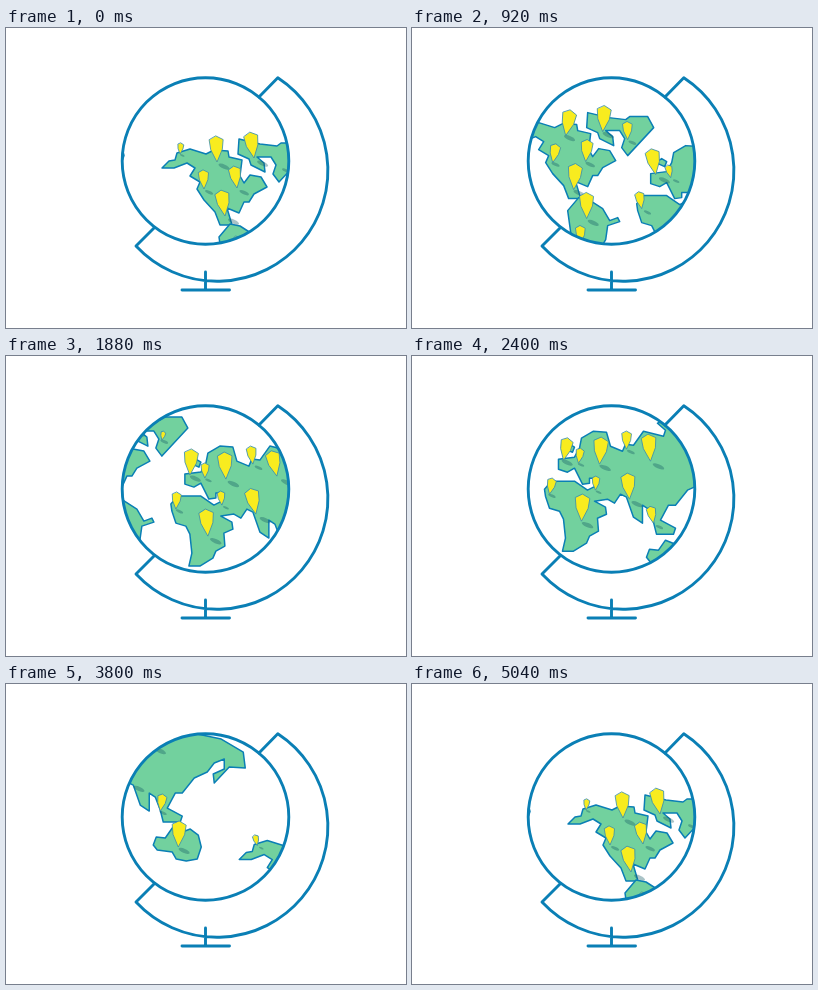
Recreate the animation shown at these times as an HTML page with a canvas. Size 400x300 px, loop 5.08 s.

```html
<!DOCTYPE html>
<html lang="en">
<head>
<meta charset="utf-8">
<title>Spinning globe</title>
<style>
  html, body { margin: 0; width: 100%; height: 100%; overflow: hidden; background: #fff; }
  canvas { display: block; width: 400px; height: 300px; }
</style>
</head>
<body>
<canvas id="stage"></canvas>
<script>
const LOOP = 5080, STEP = 40;
const TURN = { x: 314, y: 144.5 };
const GLOBE = { x: 199.5, y: 133, r: 83.3 };
const AXIS = { x: 0.908, y: 0.418 };
const BLUE = '#0a7fb5', GREEN = '#72d19e', YELLOW = '#f8ec1f';

const northAmerica = new Path2D('M156 140L163 133 169 132 171 125 184 121 200 126 208 122 222 123 223 129 236 132 234 148 238 155 244 147 255 149 261 159 248 166 243 174 238 174 233 185 221 180 226 197 214 197 209 184 198 172 191 161 194 154 184 148 189 140 181 135 168 140Z');

const arctic = new Path2D('M233 111L232 126 243 131 245 137 259 144 258 135 251 129 265 129 270 137 267 146 273 154 299 126 293 115 275 115 271 118 254 116Z');

const southAmerica = new Path2D('M213 209L224 196 234 198 248 207 255 219 263 216 265 220 253 224 251 238 235 265 218 245Z');

const oldWorld = new Path2D('M283 209L282 202 289 194 312 194 325 203 333 199 334 191 327 191 327 196 320 197 312 181 305 185 296 182 296 172 312 170 317 161 319 151 331 144 344 145 348 159 360 164 363 157 371 158 381 144 401 149 403 143 395 136 402 133 414 146 428 159 452 164 474 177 476 193 460 192 445 208 444 199 455 194 455 184 445 188 438 197 425 203 413 218 406 218 398 233 413 241 411 247 394 247 391 235 386 222 380 218 380 236 371 230 364 210 358 207 352 216 345 212 332 214 343 220 344 227 335 231 336 244 327 249 324 256 311 264 300 264 303 251 301 232 297 224 287 221Z');

const isle = new Path2D('M301 161L307 157 312 160 310 165Z');

const australia = new Path2D('M384 270L387 262 396 263 403 253 413 257 421 254 429 260 432 272 428 284 417 286 407 284 403 277 388 275Z');

const lands = [northAmerica, arctic, southAmerica, oldWorld, isle, australia];

// Tip x, tip y, height
const pins = [
  [174, 126, 11], [248, 130, 26], [211, 134, 26], [273, 138, 18],
  [231, 160, 22], [198, 161, 19], [219, 188, 26], [232, 217, 26], [226, 242, 18],
  [364, 162, 18], [301, 173, 26], [388, 174, 27], [316, 176, 15],
  [337, 177, 27], [333, 203, 14], [287, 207, 17], [367, 212, 26],
  [319, 234, 27], [391, 236, 17], [409, 272, 26]
];
const pinShape = new Path2D('M0-26L7-22.2L5.8-12.5L0 0L-5.8-12.5L-7-22.2Z');
const frame = new Path2D('M253 69L271.8 49.8A110.8 110.8 0 1 1 130 218L148.5 199.5M199.5 244V262M176 262H223.5');
const disc = new Path2D();
disc.arc(GLOBE.x, GLOBE.y, GLOBE.r, 0, Math.PI * 2);

const canvas = document.getElementById('stage');
const ctx = canvas.getContext('2d');
const dpr = window.devicePixelRatio || 1;
canvas.width = 400 * dpr;
canvas.height = 300 * dpr;

function smooth(a, b, v) {
  const k = Math.min(1, Math.max(0, (v - a) / (b - a)));
  return k * k * (3 - 2 * k);
}

// Signed distance from the globe's axis, along the direction of travel
const across = (x, y) => (x - GLOBE.x) * AXIS.x + (y - GLOBE.y) * AXIS.y;

function drawShadow(x, y, h) {
  const k = h / 26, d = (6.5 + across(x, y) * 0.05) * k;
  ctx.fillStyle = 'rgba(20, 90, 100, 0.36)';
  ctx.beginPath();
  ctx.ellipse(x + d, y + d * 0.65, 6 * k, 2.1 * k, 0.42, 0, Math.PI * 2);
  ctx.fill();
}

function drawPin(x, y, h) {
  const s = across(x, y);
  const size = smooth(-68, -52, s) * smooth(69, 58, s) * h / 26;
  if (size < 0.02) return;
  ctx.save();
  ctx.translate(x, y);
  ctx.rotate(-s * 0.2 * Math.PI / 180);
  ctx.scale(size, size);
  ctx.fillStyle = YELLOW;
  ctx.fill(pinShape);
  ctx.lineWidth = 0.8 / size;
  ctx.strokeStyle = '#3a8fae';
  ctx.stroke(pinShape);
  ctx.restore();
}

function drawMap(dx, dy) {
  ctx.save();
  ctx.translate(dx, dy);
  ctx.fillStyle = GREEN;
  ctx.strokeStyle = BLUE;
  ctx.lineWidth = 1.5;
  for (const land of lands) {
    ctx.fill(land);
    ctx.stroke(land);
  }
  ctx.restore();
  for (const [x, y, h] of pins) drawShadow(x + dx, y + dy, h);
  for (const [x, y, h] of pins) drawPin(x + dx, y + dy, h);
}

function draw(time) {
  const t = Math.floor((time % LOOP) / STEP) * STEP;
  const turn = t / (LOOP - STEP);
  ctx.setTransform(dpr, 0, 0, dpr, 0, 0);
  ctx.fillStyle = '#fff';
  ctx.fillRect(0, 0, 400, 300);
  ctx.lineJoin = ctx.lineCap = 'round';

  ctx.save();
  ctx.clip(disc);
  for (let copy = -1; copy <= 1; copy++) {
    drawMap((copy - turn) * TURN.x, (copy - turn) * TURN.y);
  }
  ctx.restore();

  ctx.strokeStyle = BLUE;
  ctx.lineWidth = 2.9;
  ctx.stroke(disc);
  ctx.stroke(frame);
}

const start = performance.now();
function tick() {
  draw(performance.now() - start);
  requestAnimationFrame(tick);
}
tick();
</script>
</body>
</html>
```
